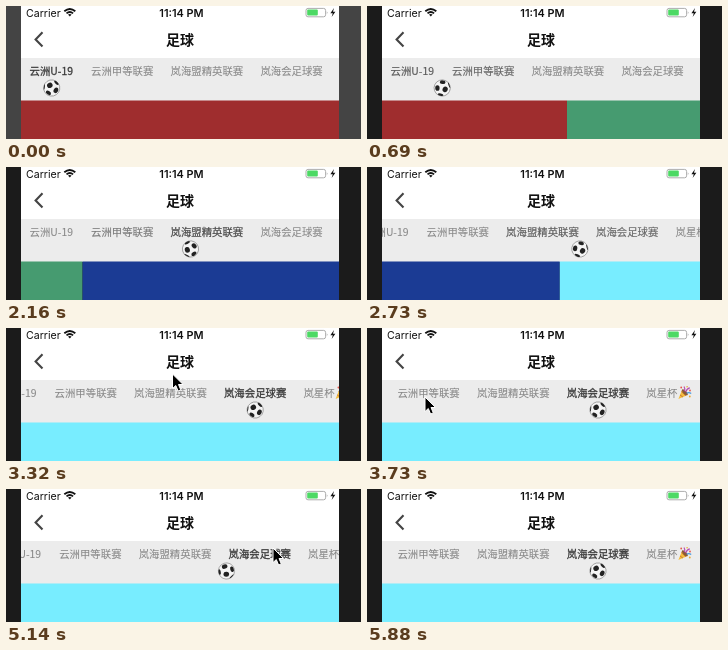
These frames come from a looping animation (355 px wide and 133 px high, 6200 ms). An HTML page:

```html
<!DOCTYPE html>
<html lang="zh-CN">
<head>
<meta charset="utf-8">
<title>足球</title>
<style>
  html, body { margin: 0; width: 100%; height: 100%; overflow: hidden; background: #1b1b1b; }
  svg { display: block; width: 100vw; height: 100vh; }
  .status { font: 10.6px Inter, "Liberation Sans", sans-serif; fill: #111; }
  .cjk { font-family: "Noto Sans CJK SC", "Noto Sans CJK", sans-serif; }
</style>
</head>
<body>
<svg viewBox="0 0 355 133">
  <defs>
    <clipPath id="screen"><rect x="15" width="318" height="133"/></clipPath>
  </defs>
  <rect id="backdrop" width="355" height="133"/>
  <g clip-path="url(#screen)">
    <rect x="15" width="318" height="53" fill="#fff"/>
    <rect x="15" y="52" width="318" height="43" fill="#ececec"/>
    <g id="pages"></g>

    <text class="status" x="20" y="10.5">Carrier</text>
    <g fill="none" stroke="#111" stroke-width="1.8">
      <path d="M58.3 5.3Q63.8 0.6 69.3 5.3M60.5 7.4Q63.8 4.6 67.1 7.4"/>
      <path d="M62 8.6Q63.8 7.2 65.6 8.6L63.8 10.6Z" fill="#111" stroke="none"/>
    </g>
    <text class="status" x="175.5" y="10.5" text-anchor="middle" style="font-weight:600;font-size:10.9px">11:14 PM</text>
    <rect x="300" y="2.4" width="19.6" height="8.4" rx="2" fill="#fff" stroke="#999" stroke-width=".8"/>
    <rect x="301.2" y="3.6" width="10.6" height="6" rx="1" fill="#4cd964"/>
    <path d="M320.8 5.2Q322.4 6.6 320.8 8Z" fill="#999"/>
    <path d="M328 2L324.4 7.2H326.8L325.6 11L329.4 5.8H327Z" fill="#111"/>

    <path d="M36.5 26.3L29.6 33.4L36.5 40.5" fill="none" stroke="#444" stroke-width="2.1"/>
    <text class="cjk" x="174" y="38.8" text-anchor="middle" font-size="14" font-weight="700" fill="#111">足球</text>

    <g id="strip">
      <g id="tabs" class="cjk" font-size="10.4"></g>
      <g transform="translate(365.4 57.5)">
        <path d="M.6 13.4L4.3 4.2Q8.6 5.6 9.8 9.6Z" fill="#f3bd3c"/>
        <path d="M2.2 9.4L5.1 11.6M3.6 6L8 10.3" stroke="#c8743a"/>
        <ellipse cx="7" cy="6.8" rx="1.6" ry="3.8" transform="rotate(-45 7 6.8)" fill="#8a5a35"/>
        <path d="M6.4 5.6Q7.8 3.5 6.2 1M8 6.4Q9 3 12 2.4" fill="none" stroke="#b54bb0" stroke-width="1.2"/>
        <path d="M8.8 7.8Q11 6.2 13.4 8" fill="none" stroke="#4a9be0" stroke-width="1.2"/>
        <g fill="#e4574c"><circle cx="3.4" cy="2" r=".9"/><circle cx="12.2" cy="5" r=".9"/></g>
        <g fill="#e9a92e"><circle cx="9.3" cy="1.2" r=".8"/><circle cx="12" cy="11" r=".9"/></g>
      </g>
      <g id="ball"></g>
    </g>
    <path id="cursor" d="M0 0V14.6L3.3 11.5L5.6 17L8.3 15.9L6 10.5H10.6Z" fill="#000" stroke="#fff" stroke-linejoin="round"/>
  </g>
</svg>
<script>
const LOOP = 6200, PAGE_WIDTH = 318, MAX_SCROLL = 54.6;
const $ = id => document.getElementById(id);

function add(parent, tag, attrs, text = "") {
  const node = document.createElementNS("http://www.w3.org/2000/svg", tag);
  for (const key in attrs) node.setAttribute(key, attrs[key]);
  node.textContent = text;
  return parent.appendChild(node);
}

const clamp = (v, lo, hi) => Math.min(hi, Math.max(lo, v));
const mix = (a, b, k) => a + (b - a) * k;
const smooth = k => k * k * (3 - 2 * k);
const easeOut = k => 1 - (1 - k) ** 2;
const progress = (t, start, duration, ease) => ease(clamp((t - start) / duration, 0, 1));

// Tabs are laid out left to right by the width of their labels.
const labels = ["云洲U-19", "云洲甲等联赛", "岚海盟精英联赛", "岚海会足球赛", "岚星杯"];
const labelWidth = label => [...label].reduce((sum, c) => sum + (c > "z" ? 10.4 : 5.9), 0);
let left = 23.5;
const tabs = labels.map(label => {
  const width = labelWidth(label);
  const node = add($("tabs"), "text", { x: left, y: 69 }, label);
  const center = left + width / 2;
  left += width + 17.1;
  return { node, center, scroll: clamp(center - 175.5, 0, MAX_SCROLL) };
});

["#9f2d2e", "#469b70", "#1b3b94", "#78edff"].forEach((fill, i) => add($("pages"), "rect", {
  x: 15 + i * PAGE_WIDTH, y: 94.5, width: PAGE_WIDTH, height: 39, fill
}));

// Dark patches sit on the corners of a tilted icosahedron.
function drawBall(radius, tilt) {
  const ball = $("ball");
  add(ball, "circle", { r: radius, fill: "#f4f4f4", stroke: "#8a8a8a", "stroke-width": .7 });
  const corners = [[0, 0, 1]];
  for (let i = 0; i < 5; i++) {
    const a = i * Math.PI * 0.4;
    const corner = [0.894 * Math.cos(a), 0.894 * Math.sin(a), 0.447];
    corners.push(corner, corner.map(v => -v));
  }
  for (const [x, y0, z0] of corners) {
    const y = y0 * Math.cos(tilt) - z0 * Math.sin(tilt);
    const z = y0 * Math.sin(tilt) + z0 * Math.cos(tilt);
    if (z < 0.05) continue;
    const angle = Math.atan2(y, x) * 180 / Math.PI;
    add(ball, "ellipse", {
      cx: Math.hypot(x, y) * radius * 0.93, rx: radius * 0.35 * z, ry: radius * 0.35,
      transform: `rotate(${angle})`, fill: "#222"
    });
  }
}
drawBall(8.1, 0.45);

const swipes = [540, 1630, 2550];
const taps = [{ at: 3980, tab: 1 }, { at: 4980, tab: 3 }];
const scrolls = [...swipes.map((at, i) => ({ at: at + 650, tab: i + 1 })), ...taps];
const glides = [
  { at: 3330, ms: 400, x: 58, y: 69 },
  { at: 4280, ms: 500, x: 267, y: 59 },
  { at: 5200, ms: 400, x: 296, y: 90 },
  { at: 5600, ms: 280, x: 310, y: 133 }
];

// A swipe drags part of the way, rests, then settles on the next page.
const swipe = (t, at) =>
  mix(0.445 * progress(t, at, 200, easeOut), 1, progress(t, at + 400, 320, easeOut));

const swiped = t => swipes.reduce((sum, at) => sum + swipe(t, at), 0);

function centerAt(page) {
  const i = Math.min(2, Math.floor(page));
  return mix(tabs[i].center, tabs[i + 1].center, page - i);
}

function render(t) {
  const dragged = swiped(t);
  const page = taps.reduce((p, tap) => t >= tap.at + 40 ? tap.tab : p, dragged);
  const slide = (from, value) => taps.reduce(
    (v, tap) => mix(v, value(tap.tab), progress(t, tap.at, 225, smooth)), from);
  const ballX = slide(centerAt(dragged), tab => tabs[tab].center);
  const turn = slide(dragged, tab => tab) * 360 - 35;
  const scroll = scrolls.reduce(
    (v, s) => mix(v, tabs[s.tab].scroll, progress(t, s.at, 290, smooth)), 0);

  $("backdrop").setAttribute("fill", t < 570 ? "#444" : "#1b1b1b");
  $("pages").setAttribute("transform", `translate(${-page * PAGE_WIDTH} 0)`);
  $("strip").setAttribute("transform", `translate(${-scroll} 0)`);
  $("ball").setAttribute("transform", `translate(${ballX} 82) rotate(${turn})`);

  tabs.forEach(({ node }, i) => {
    const active = Math.max(0, 1 - Math.abs(page - i));
    const gray = Math.round(mix(136, 58, active));
    const color = `rgb(${gray},${gray},${gray})`;
    node.setAttribute("fill", color);
    node.setAttribute("stroke", color);
    node.setAttribute("stroke-width", mix(0.08, 0.28, active));
  });

  const [x, y] = glides.reduce(([px, py], g) => {
    const k = progress(t, g.at, g.ms, easeOut);
    return [mix(px, g.x, k), mix(py, g.y, k)];
  }, [166.5, 46]);
  $("cursor").setAttribute("transform", `translate(${x} ${y})`);
  $("cursor").setAttribute("visibility", t >= 3320 && t < 5880 ? "visible" : "hidden");
}

const start = performance.now();
function tick() {
  render((performance.now() - start) % LOOP);
  requestAnimationFrame(tick);
}
tick();
</script>
</body>
</html>
```
